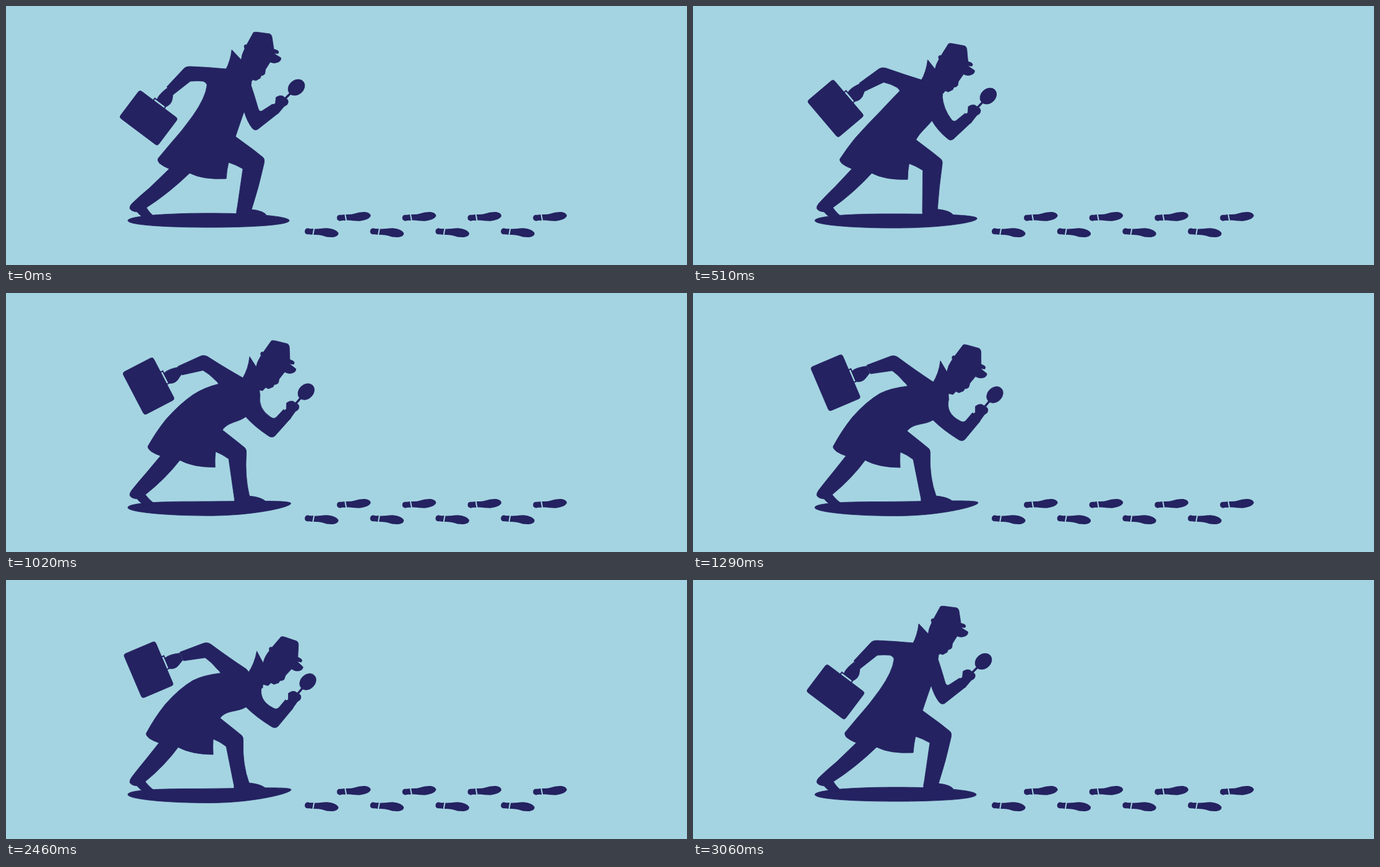
An HTML page that plays this animation: 1101 by 420 pixels, repeating every 3.6 s.

```html
<!DOCTYPE html>
<html lang="en">
<head>
<meta charset="utf-8">
<title>Detective following footprints</title>
<style>
html, body { margin: 0; width: 100%; height: 100%; overflow: hidden; background: #a4d4e1; }
svg { display: block; width: 100%; height: 100%; fill: #242261; }
#figure { stroke: #242261; stroke-width: .8; }
</style>
</head>
<body>
<svg viewBox="0 0 1101 420">
  <defs>
    <path id="print" d="M14 1Q8 1.500 5 .3Q0 1 0 5.500Q0 9.500 4 10.300Q9 10 12.300 11ZM16 1.500C23 2 29 0 37 .3Q51 2 54.500 8Q55 13.500 46 15Q36 15.500 29 12.500Q23 10.500 14.300 11Z"/>
  </defs>
  <g id="trail"></g>
  <g id="figure">
    <g id="body"></g>
    <g id="bag">
      <rect x="-38.700" y="-27.700" width="77.400" height="55.400" rx="4"/>
      <path d="M-5 -57Q-10 -40 -7 -32L11 -31Q16 -38 13 -46L7 -57Z"/>
      <path d="M-11 -26V-31.500H11V-26" fill="none" stroke-width="2"/>
    </g>
    <g id="lens">
      <ellipse rx="14.600" ry="11.600" transform="rotate(-40)"/>
      <path d="M-8 8L-20 20" stroke-width="3.500"/>
      <path d="M-34 26L-33 16Q-27 12 -22 14L-14 20Q-12 24 -15 28L-20 31L-30 43L-40 29Z"/>
    </g>
    <path id="head" d="M400 43Q402 41.800 407 42.500L426 45Q429 46 430 50L433 70L439 72Q442 74 440 77L433 77L444.500 84Q445 89 440 91Q434 94 427 91L419.500 103L418.500 110Q416 113 412.500 113L411 117L404 121L399 119.500L395 125L376 124L380 92Q380 80 386 69L385 66Q385 62 389 63Z"/>
  </g>
</svg>
<script>
const $ = id => document.getElementById(id);
const NS = 'http://www.w3.org/2000/svg';
const LOOP = 3600, STEP = 30;

// Each part: upright pose, crouched pose, and optionally crouched with the head bowed.
const parts = [
  // shadow
  ['M197 348C197 341 255 336 328 336S458 341 458 348S400 359 328 359S197 355 197 348Z',
   'M197 348C197 342 228 338.500 300 338.500S461 334 461 340S400 361.500 328 361.500S197 355 197 348Z'],
  // back leg
  ['M266 262L232 295Q215 309 203 321Q200 324 200 328Q202 333 212 334Q217 341 224 343L240 341Q234 338 227 327Q263 304 299 269Z',
   'M249 262L226 291Q212 308 203 320Q200 324 200 328Q202 333 212 334Q217 341 224 343L240 341Q234 338 225 327Q257 301 280 269Z'],
  // front leg
  ['M370 211L400 233L415 245Q419 248 417 256Q409 293 397 330Q416 332 421 339L373 339Q372 333 374 326L383 264Q371 257 358 253Z',
   'M345 223L370 243L381 252Q384 255 383.500 261Q382 299 393 329Q414 331 421 339L369 339Q369 333 367 325L356 270Q346 262 333 257Z'],
  // coat and back arm
  ['M356 102Q325 99 297 98Q291 98 288 101L260 131L270 144L298 122Q310 121 319 122Q324 124 325 128Q323 148 302 178Q285 202 266 223Q256 235 246 247Q244 250 248 255Q254 260 264 264L297 271Q318 282 356 280Q357 265 360 253L371 212C375 200 380 185 385 171L397 124Z',
   'M388 144Q362 127 331 104Q325 100 318 103L281 117L287 131L322 126Q332 133 341 144Q345 147 347 151Q320 154 302 163Q280 176 258 201Q241 222 227 248Q225 251 232 257Q238 261 247 264L278 271Q300 283 335 283Q334 270 335 258L346 224C357 210 373 215 388 206L413 172Z'],
  // front arm
  ['M385 171Q390 188 398 198Q402 203 407 200L440 174L431 159L414 170Q410 172 408 167Q402 146 395 125L375 140Z',
   'M388 206Q404 222 428 237Q435 242 440 237L464 208L452 194L441 207Q437 211 431 207Q408 195 413.500 172L395 175Z'],
  // collar
  ['M355 104Q363 89 365 71L381 88L396 124L370 150Z',
   'M387 145Q397 129 399 109L411 129L413 172L380 180Z',
   'M392 150Q402 135 405.500 115.500L417 137L415 175L380 182Z']
].map(([a, b, c = b]) => {
  const el = $('body').appendChild(document.createElementNS(NS, 'path'));
  const nums = s => s.match(/[\d.]+/g).map(Number);
  return { el, shape: a, a: nums(a), b: nums(b), c: nums(c) };
});

const ramp = (t, from, to) => Math.min(1, Math.max(0, (t - from) / (to - from)));
const place = (id, x, y, angle, rest = '') =>
  $(id).setAttribute('transform', `translate(${x} ${y}) rotate(${angle}) ${rest}`);

function addPrint(x, y, flip) {
  const use = $('trail').appendChild(document.createElementNS(NS, 'use'));
  use.setAttribute('href', '#print');
  use.setAttribute('transform', `translate(${x} ${y}) scale(1 ${flip})`);
}
for (let i = 0; i < 4; i++) {
  addPrint(483 + i * 105.7, 360, 1);
  addPrint(535 + i * 105.7, 349, -1);
}

function draw(t) {
  const crouch = ramp(t, 0, 1200) - ramp(t, 2550, 3060);
  const bow = ramp(t, 1200, 1800) - ramp(t, 2700, 3060);
  const arc = 4 * crouch * (1 - crouch);

  for (const { el, shape, a, b, c } of parts) {
    let i = 0;
    el.setAttribute('d', shape.replace(/[\d.]+/g, () => {
      const v = a[i] + (b[i] - a[i]) * crouch + (c[i] - b[i]) * bow;
      i++;
      return v.toFixed(2);
    }));
  }
  place('bag', 230.5, 181.5 - 36 * crouch, 37 + 30 * crouch);
  place('lens', 469.5 + 18.5 * crouch, 132 + 33 * crouch, -5 * crouch);
  place('head',
    398 + 26.7 * crouch - 2 * arc + 4.8 * bow,
    110 + 38.8 * crouch + 1.5 * arc + 8.4 * bow,
    7.5 * crouch + 4 * bow,
    'translate(-398 -110)');
}

const start = performance.now();
function tick() {
  const t = (performance.now() - start) % LOOP;
  draw(Math.floor(t / STEP) * STEP);
  requestAnimationFrame(tick);
}
tick();
</script>
</body>
</html>
```
